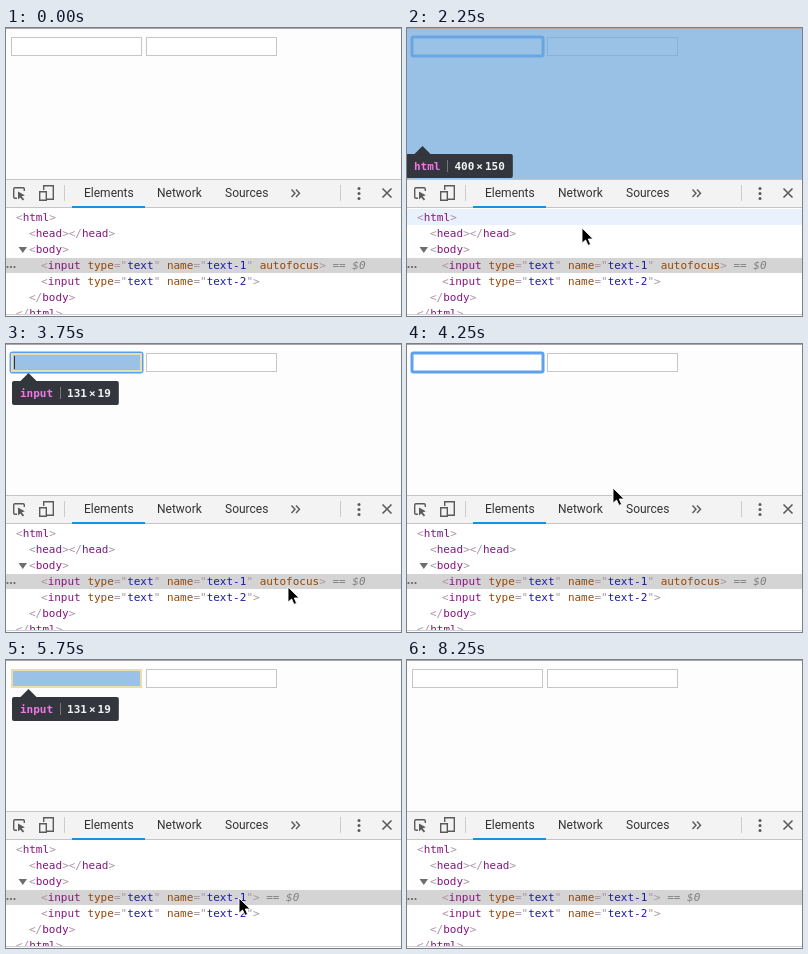
Write an HTML page that moves like this. It is 395 by 288 pixels and loops after 9.5 s.

```html
<!DOCTYPE html>
<html lang="en">
<head>
<meta charset="utf-8">
<title>Autofocus in the inspector</title>
<style>
html, body { margin: 0; width: 100%; height: 100%; overflow: hidden; background: #fdfdfd; }
svg { display: block; }
text { white-space: pre; }
.code { font: 11px "DejaVu Sans Mono", monospace; fill: #a894a6; }
.tab { font: 12px Roboto, sans-serif; fill: #333; }
.tag { fill: #881280; }
.attr { fill: #994500; }
.val { fill: #1a1aa6; }
.ref { fill: #808080; font-style: italic; }
.tip { font: bold 11px "DejaVu Sans Mono", monospace; fill: #f4f4f4; }
.icon { fill: none; stroke: #5a5a5a; stroke-width: 1.4; }
</style>
</head>
<body>
<svg width="395" height="288" viewBox="0 0 395 288">
  <defs><filter id="soft" x="-10%" y="-50%" width="120%" height="200%"><feGaussianBlur stdDeviation=".7"/></filter></defs>

  <!-- page -->
  <rect width="395" height="288" fill="#fdfdfd"/>
  <g fill="#fff" stroke="#c6c6c6">
    <rect x="5.5" y="9.5" width="130" height="18"/>
    <rect x="140.5" y="9.5" width="130" height="18"/>
  </g>
  <g id="focus" fill="none">
    <rect x="5" y="9" width="131" height="19" rx="1.5" stroke="#5b9ff0" stroke-width="3" filter="url(#soft)"/>
    <rect x="5.5" y="9.5" width="130" height="18" stroke="#64a2ea"/>
  </g>
  <rect id="pageShade" y="1" width="395" height="150" fill="#6fa8dc" opacity=".7"/>
  <g id="inputShade">
    <rect x="5" y="9" width="131" height="19" fill="#e9dcae"/>
    <rect x="7" y="11" width="127" height="15" fill="#9cc1e6"/>
  </g>
  <path id="caret" d="M8.5 12v13" stroke="#333"/>
  <path d="M0 .5h395" stroke="#aca6a6"/>

  <!-- inspector -->
  <rect y="151" width="395" height="29" fill="#f3f3f3"/>
  <path d="M0 151.5h395M0 179.5h395" stroke="#c4c4c4"/>
  <rect x="66" y="178" width="73" height="2" fill="#1592e6"/>
  <g class="icon">
    <path d="M11 170.3H9Q7.7 170.3 7.7 169V161Q7.7 159.7 9 159.7H17Q18.3 159.7 18.3 161V163"/>
    <path d="M12 163.5V171.5L14.2 169.6 16.8 172.5 18.2 171.2 15.6 168.4 18.8 167.2Z" fill="#5a5a5a" stroke="none"/>
    <path d="M37.7 162V157.7H47.3V171.3H41M33.7 163.7H40.3V172.3H33.7Z"/>
    <path d="M285.5 161.5l3.5 3.7-3.5 3.7M290 161.5l3.5 3.7-3.5 3.7"/>
    <path d="M376.5 160.5l9 9M385.5 160.5l-9 9" stroke-width="1.6"/>
  </g>
  <path d="M58.5 157v16M334.5 157v16" stroke="#ccc"/>
  <g fill="#5a5a5a"><circle cx="353" cy="160.5" r="1.5"/><circle cx="353" cy="165.5" r="1.5"/><circle cx="353" cy="170.5" r="1.5"/></g>
  <g class="tab"><text x="78" y="169">Elements</text><text x="151" y="169">Network</text><text x="219" y="169">Sources</text></g>
  <rect y="180" width="395" height="106" fill="#fff"/>
  <rect id="rowShade" width="395" height="16" fill="#e9f1fc"/>
  <rect y="230" width="395" height="15" fill="#d4d4d4"/>
  <g fill="#666"><circle cx="1.5" cy="239" r="1.1"/><circle cx="5" cy="239" r="1.1"/><circle cx="8.5" cy="239" r="1.1"/></g>
  <path d="M12.5 219h8.5l-4.2 6z" fill="#6e6e6e"/>
  <g id="tree" class="code"></g>
  <rect y="286" width="395" height="2" fill="#fdfdfd"/>
  <path d="M0 286.5h395" stroke="#d0d0d0"/>
  <g id="tips"></g>
  <path id="cursor" d="M0 0V15.2L3.6 12 6 17.4 8.6 16.3 6.3 11H11.2Z" fill="#000" stroke="#fff" stroke-width=".9"/>
</svg>
<script>
const LOOP = 9500, STEP = 250, CHAR = 6.62;
const el = id => document.getElementById(id);
const show = (id, on) => el(id).style.display = on ? '' : 'none';

function paint(html) {
  const span = (cls, s) => `<tspan class="${cls}">${s}</tspan>`;
  return html.replace(/[<>]/g, c => c === '<' ? '&lt;' : '&gt;')
    .replace(/(&lt;\/?)(\w+)|( )([a-z]+)(?:="([^"]*)")?/g, (m, open, tag, gap, attr, val) =>
      tag ? open + span('tag', tag)
          : gap + span('attr', attr) + (val ? '="' + span('val', val) + '"' : ''));
}

function line(row, x, html, id = '', note = '') {
  return `<text id="${id}" x="${x}" y="${193 + row * 16}">${paint(html)}<tspan class="ref">${note}</tspan></text>`;
}

const first = '<input type="text" name="text-1"';
el('tree').innerHTML =
  line(0, 10, '<html>') +
  line(1, 23, '<head></head>') +
  line(2, 23, '<body>') +
  line(3, 35, first + ' autofocus>', 'withAuto', ' == $0') +
  line(3, 35, first + '>', 'noAuto', ' == $0') +
  line(4, 35, '<input type="text" name="text-2">') +
  line(5, 23, '</body>') +
  line(6, 10, '</html>');

function tip(name, x, y, w, h) {
  const sep = x + 8 + name.length * CHAR + 7, num = sep + 7;
  const times = num + `${w}`.length * CHAR + 2, high = times + CHAR + 2;
  const right = high + `${h}`.length * CHAR + 8;
  return `<g id="${name}Tip" class="tip">
    <rect x="${x}" y="${y}" width="${right - x}" height="24" rx="2" fill="#33363d"/>
    <path d="M${x + 8} ${y + .5}l8.5-8.5 8.5 8.5z" fill="#33363d"/>
    <path d="M${Math.round(sep) + .5} ${y + 6}v12" stroke="#777"/>
    <text x="${x + 8}" y="${y + 15.5}" fill="#ee78e6" style="fill:#ee78e6">${name}</text>
    <text y="${y + 15.5}"><tspan x="${num}">${w}</tspan><tspan x="${times}">×</tspan><tspan x="${high}">${h}</tspan></text></g>`;
}
el('tips').innerHTML = tip('html', -1, 126, 400, 150) + tip('input', 6, 37, 131, 19);

// start time, pointer x, pointer y, hovered element
const moves = [
  [1250, 150, 66], [1500, 168, 124], [1750, 174, 172], [2000, 175, 202, 'html'], [2250, 175, 200, 'html'],
  [2500, 190, 208, 'head'], [2750, 228, 224, 'head'], [3000, 268, 244, 'input'], [3250, 282, 243, 'input'],
  [4000, 247, 194, 'html'], [4250, 206, 144], [4500, 160, 62],
  [5000, 183, 108], [5250, 214, 149], [5500, 226, 194, 'html'], [5750, 233, 238, 'input'], [6000, 232, 239, 'input'],
  [6250, 206, 166], [6500, 172, 118], [6750, 136, 72], [7000, 108, 40], [7250, 95, 26], [7500, 92, 23], [7750, 91, 22]
];

function draw(now) {
  const t = Math.floor(now % LOOP / STEP) * STEP;
  const move = t < 8250 && moves.findLast(m => m[0] <= t);
  const [, x, y, hover] = move || [];
  const auto = t < 4750;
  show('withAuto', auto);
  show('noAuto', !auto);
  show('focus', auto && t >= 1250);
  show('caret', t >= 3750 && t < 4250);
  show('pageShade', hover === 'html');
  show('htmlTip', hover === 'html');
  show('inputShade', hover === 'input');
  show('inputTip', hover === 'input');
  show('rowShade', hover === 'html' || hover === 'head');
  el('rowShade').setAttribute('y', hover === 'head' ? 197 : 181);
  show('cursor', move);
  if (move) el('cursor').setAttribute('transform', `translate(${x} ${y})`);
}

const start = performance.now();
(function frame() {
  draw(performance.now() - start);
  requestAnimationFrame(frame);
})();
</script>
</body>
</html>
```
